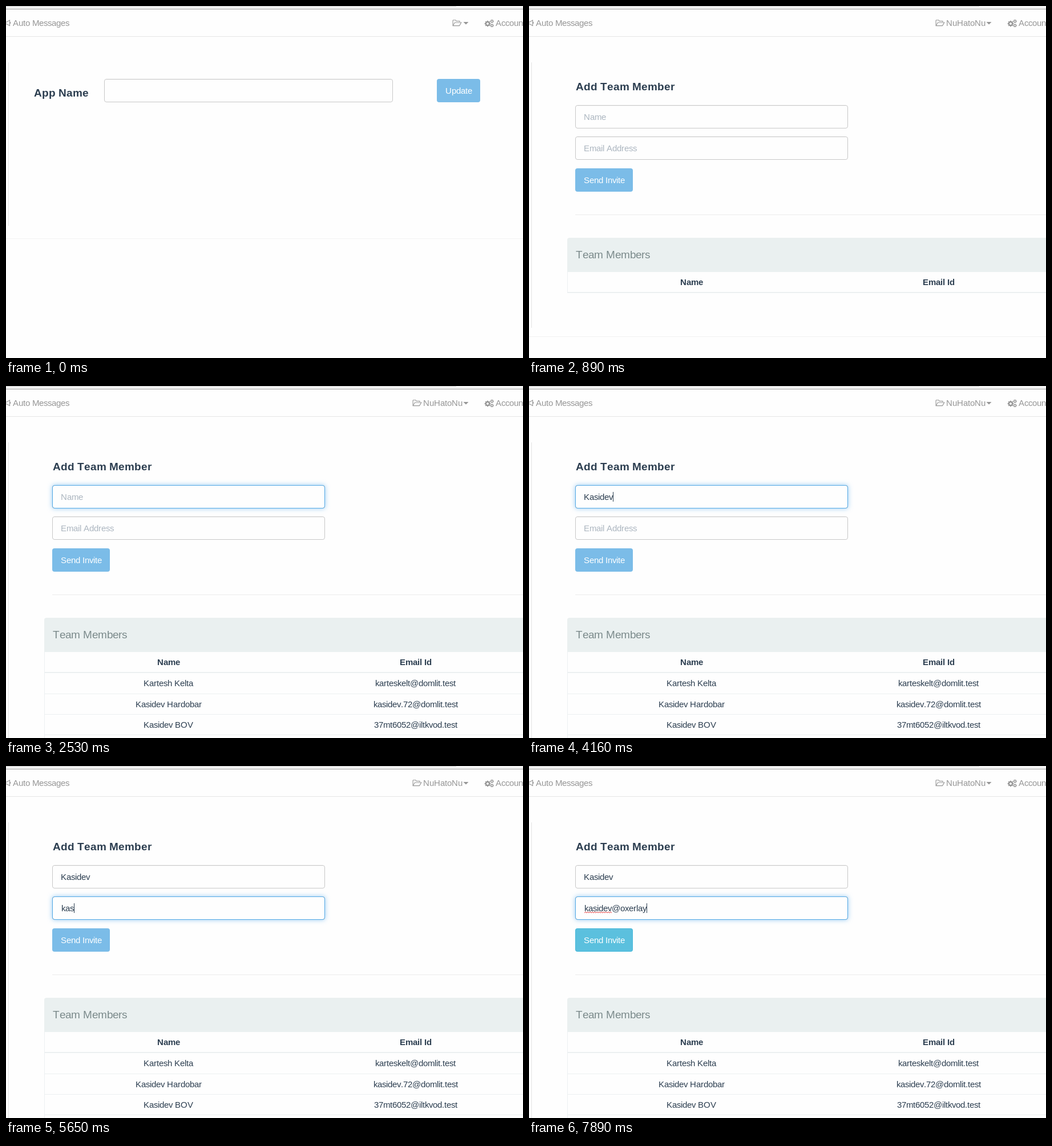
Write an HTML page with a canvas that moves like this. It is 906 px wide and 618 px high and loops after 8000 ms.

```html
<!DOCTYPE html>
<html lang="en">
<head>
<meta charset="utf-8">
<title>Add team member</title>
<style>
html, body { margin: 0; width: 100%; height: 100%; overflow: hidden; background: #fefefe; }
canvas { display: block; }
</style>
</head>
<body>
<canvas id="stage" width="906" height="618"></canvas>
<script>
const ctx = document.getElementById('stage').getContext('2d');
const LOOP = 8000;
const INK = '#2c3e50', NAV = '#969696', PALE = '#ecf0f1', HINT = '#acb6c0';
const FAMILY = '"Liberation Sans", Arial, sans-serif';

const APP = 'NuHatoNu';
const MEMBER = 'Kasidev';
const EMAIL = 'kasidev@oxerlay';
const TEAM = [
  ['Kartesh Kelta', 'karteskelt@domlit.test'],
  ['Kasidev Hardobar', 'kasidev.72@domlit.test'],
  ['Kasidev BOV', '37mt6052@iltkvod.test']
];

// [time, value] steps; each value holds until the next
const NAME_KEYS = [[0, 0], [2830, 1], [3120, 2], [3570, 3], [3720, 4], [3860, 6], [4160, 7]];
const EMAIL_KEYS = [[0, 0], [5200, 1], [5350, 2], [5650, 3], [5800, 4], [5950, 5], [6100, 7],
  [6550, 8], [7000, 9], [7150, 10], [7450, 11], [7600, 12], [7740, 13], [7890, 15]];
const NAME_FOCUS = [[0, 0], [1790, 0.5], [1930, 1], [4610, 0.5], [4760, 0]];
const EMAIL_FOCUS = [[0, 0], [4610, 0.5], [4760, 1]];

const valueAt = (steps, t) => steps.filter(s => s[0] <= t).pop()[1];

function rect(x, y, w, h, color) {
  ctx.fillStyle = color;
  ctx.fillRect(x, y, w, h);
}

function rounded(x, y, w, h, r) {
  ctx.beginPath();
  ctx.roundRect(x, y, w, h, r);
}

function setFont(size, bold) {
  ctx.font = `${bold ? 'bold ' : ''}${size}px ${FAMILY}`;
}

// Whole-pixel advances, as with full font hinting
function advance(ch, bold) {
  return Math.round(ctx.measureText(ch).width - (bold ? 0 : 0.1));
}

function textWidth(str, size = 15, bold = false) {
  setFont(size, bold);
  return [...str].reduce((sum, ch) => sum + advance(ch, bold), 0);
}

function text(str, x, y, color, size = 15, bold = false) {
  setFont(size, bold);
  ctx.fillStyle = color;
  for (const ch of str) {
    ctx.fillText(ch, x, y);
    x += advance(ch, bold);
  }
}

function centered(str, cx, y, bold) {
  text(str, Math.round(cx - textWidth(str, 15, bold) / 2), y, INK, 15, bold);
}

function path(points, color, width = 1, close = false) {
  ctx.beginPath();
  points.forEach(([x, y]) => ctx.lineTo(x, y));
  if (close) ctx.closePath();
  ctx.strokeStyle = color;
  ctx.lineWidth = width;
  ctx.stroke();
}

function field(x, y, w, focus = 0) {
  if (focus) {
    ctx.save();
    ctx.shadowColor = `rgba(82, 168, 236, ${0.6 * focus})`;
    ctx.shadowBlur = 8;
    rounded(x, y, w, 41, 4);
    ctx.fillStyle = '#fff';
    ctx.fill();
    ctx.restore();
  }
  rounded(x + 0.5, y + 0.5, w - 1, 40, 3.5);
  ctx.fillStyle = '#fefefe';
  ctx.fill();
  ctx.lineWidth = 1;
  ctx.strokeStyle = '#c8c8c8';
  ctx.stroke();
  if (focus) {
    ctx.strokeStyle = `rgba(84, 169, 229, ${focus})`;
    ctx.stroke();
  } else {
    rect(x + 3, y + 1, w - 6, 1, '#f6f6f6');
  }
}

function button(label, x, y, w, active) {
  rounded(x, y, w, 41, 4);
  ctx.fillStyle = active ? '#46b8da' : '#7bbce8';
  ctx.fill();
  if (active) {
    rounded(x + 1, y + 1, w - 2, 39, 3);
    ctx.fillStyle = '#5bc0de';
    ctx.fill();
  }
  text(label, x + 15, y + 26, '#fff');
}

function squiggle(x, y, w) {
  const points = [];
  for (let i = 0; i <= w; i += 2) points.push([x + i, y + (i % 4 ? -1 : 1)]);
  path(points, '#e03a3a');
}

function gear(x, y, r, teeth) {
  ctx.strokeStyle = NAV;
  ctx.lineWidth = r * 0.42;
  ctx.beginPath();
  ctx.arc(x, y, r * 0.58, 0, 2 * Math.PI);
  ctx.stroke();
  for (let i = 0; i < teeth; i++) {
    const a = i * 2 * Math.PI / teeth, c = Math.cos(a), s = Math.sin(a);
    path([[x + c * r * 0.65, y + s * r * 0.65], [x + c * r, y + s * r]], NAV, r * 0.36);
  }
}

function folder(x) {
  path([[x + 12.5, 28], [x + 12.5, 26.5], [x + 6.5, 26.5], [x + 5.5, 24.7], [x + 1.2, 24.7],
    [x + 0.6, 25.4], [x + 0.6, 34.2]], NAV, 1.1);
  path([[x + 0.8, 34.6], [x + 4, 29], [x + 15.3, 29], [x + 12, 34.6]], NAV, 1.1, true);
}

function navbar(t) {
  rect(0, 0, 906, 5, '#f3f3f3');
  rect(0, 0, 789, 1, '#cfcfcf');
  rect(0, 5, 906, 1, '#a3a3a3');
  rect(0, 53, 906, 1, '#e5e5e5');
  path([[-1, 28.5], [1, 28.2], [6.5, 25], [6.5, 34.5], [1, 31.5], [-1, 31.2]], NAV, 1.1);
  rect(7, 28, 1, 3, NAV);
  text('Auto Messages', 12, 35, NAV);

  const named = t >= 600;
  folder(named ? 712.5 : 782.5);
  if (named) text(APP, 731, 35, NAV);
  ctx.beginPath();
  ctx.moveTo(801.5, 28);
  ctx.lineTo(810.5, 28);
  ctx.lineTo(806, 32.5);
  ctx.fillStyle = NAV;
  ctx.fill();
  gear(844, 31, 5.3, 8);
  gear(851.6, 26.8, 3.2, 6);
  gear(851.6, 34.2, 3.2, 6);
  text('Accoun', 858, 35, NAV);
}

function settingsPage(t) {
  const loaded = t >= 300;
  rect(4, 99, 1, 287, '#e3e3e3');
  rect(0, 408, 906, 1, '#f2f2f2');
  text('App Name', 49, 159, INK, 19, true);
  field(172, 128, 506);
  if (loaded) text(APP, 187, 154, INK);
  button('Update', 755, 128, 76, loaded);
}

function input(y, x, hint, typed, focus, caret) {
  field(81, y, 478, focus);
  text(typed || hint, typed ? x : 96, y + 26, typed ? INK : HINT);
  if (!caret) return;
  if (typed) rect(x + textWidth(typed), y + 12, 1, 17, INK);
  else rect(97, y + 10, 1, 20, INK);
}

function teamTable(filled) {
  rounded(67, 407, 860, 60, [4, 0, 0, 0]);
  ctx.fillStyle = '#eaf0f0';
  ctx.fill();
  text('Team Members', 82, 443, '#7b8a8b', 19);
  rect(67, 467, 1, filled ? 151 : 36, PALE);
  rect(67, 502, 839, 2, PALE);
  centered('Name', 285, 490, true);
  centered('Email Id', 718, 490, true);
  if (!filled) return;
  TEAM.forEach(([name, email], i) => {
    const y = 527 + Math.round(i * 36.5);
    centered(name, 284.5, y);
    centered(email, 717.5, y);
    rect(68, 540 + i * 36, 838, 1, PALE);
  });
}

function teamPage(t) {
  const filled = t >= 1490;
  rect(4, 99, 1, filled ? 519 : 466, '#e3e3e3');
  if (!filled) rect(0, 580, 906, 1, '#f2f2f2');
  text('Add Team Member', 82, 148, INK, 19, true);

  const name = MEMBER.slice(0, valueAt(NAME_KEYS, t));
  const email = EMAIL.slice(0, valueAt(EMAIL_KEYS, t));
  const nameCaret = (t >= 1790 && t < 2530) || (t >= 2830 && t < 4610);
  input(174, 96, 'Name', name, valueAt(NAME_FOCUS, t), nameCaret);
  input(229, 97, 'Email Address', email, valueAt(EMAIL_FOCUS, t), t >= 4610);
  if (email.includes('@')) squiggle(97, 257, 48);

  button('Send Invite', 81, 285, 101, t >= 7000);
  rect(81, 366, 825, 1, '#ececec');
  teamTable(filled);
}

function draw(now) {
  const t = now % LOOP;
  rect(0, 0, 906, 618, '#fefefe');
  navbar(t);
  if (t < 890) settingsPage(t);
  else teamPage(t);
  requestAnimationFrame(draw);
}
requestAnimationFrame(draw);
</script>
</body>
</html>
```
